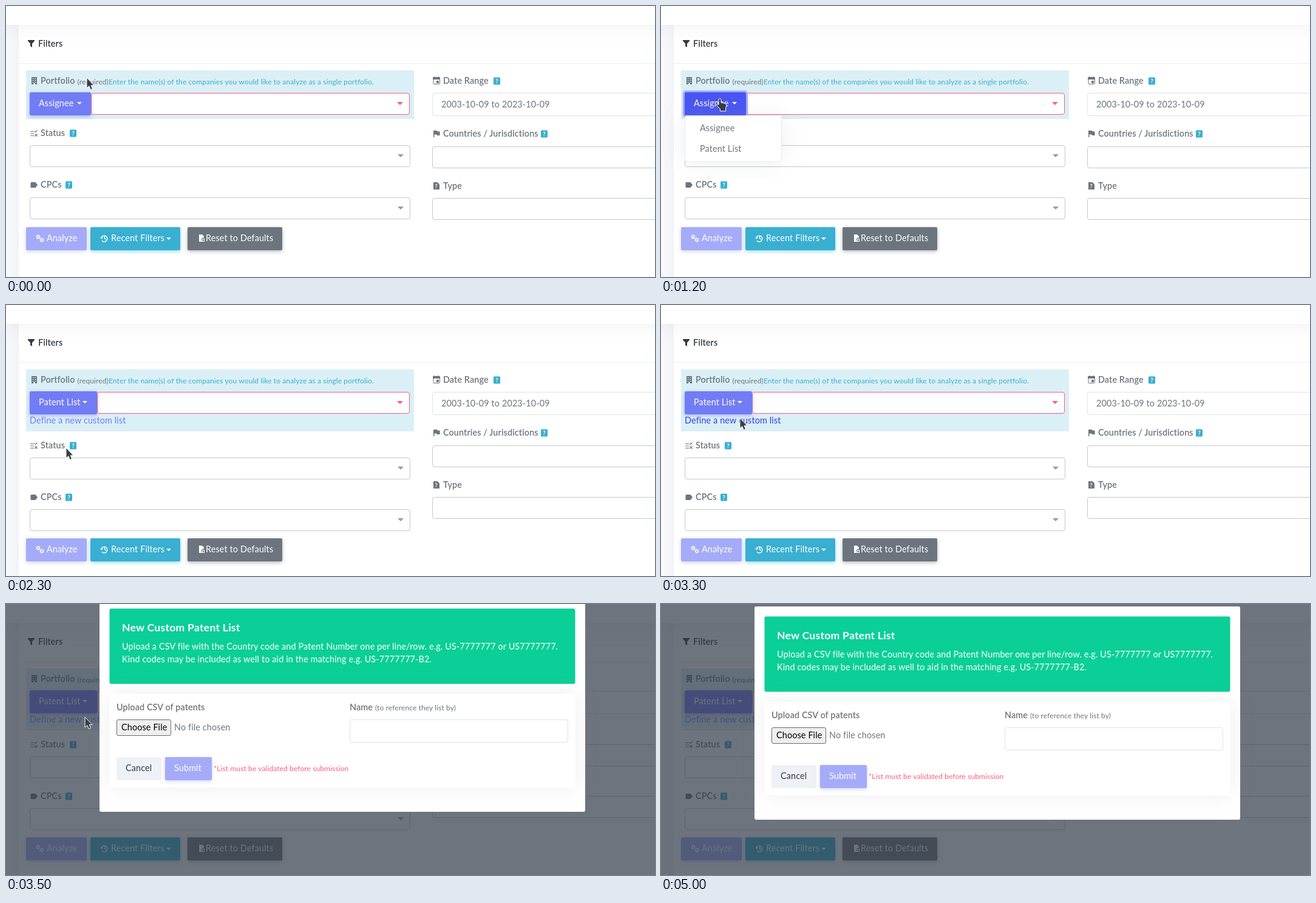
An HTML page that plays this animation: 1069x446 px, repeating every 6400 ms.

```html
<!DOCTYPE html>
<html lang="en">
<head>
<meta charset="utf-8">
<title>Portfolio filters</title>
<style>
  html, body { margin: 0; width: 100%; height: 100%; overflow: hidden; background: #fff; }
  svg { display: block; width: 1069px; height: 446px; }
  text { font-family: Lato, "Open Sans", sans-serif; font-size: 14.4px; letter-spacing: .13px; white-space: pre; }
  .soft { filter: drop-shadow(0 0 17.5px rgba(154, 161, 171, .18)); }
</style>
</head>
<body>
<svg id="stage" viewBox="0 0 1069 446"></svg>
<script>
const NS = 'http://www.w3.org/2000/svg';
const GRAY = '#6c757d', INFO = '#39afd1', RED = '#fa5c7c', DARK = '#313a46', LINE = '#c4c7ca', PALE = '#a5abf8';
const LOOP = 6400;
const stage = document.getElementById('stage');

function add(parent, tag, attrs) {
  const el = document.createElementNS(NS, tag);
  for (const k in attrs) el.setAttribute(k, attrs[k]);
  return parent.appendChild(el);
}
const group = (parent, attrs) => add(parent, 'g', attrs);
const path = (p, d, fill, more) => add(p, 'path', { d, fill, ...more });
const stroke = (p, d, color, w = 1.4) => path(p, d, 'none', { stroke: color, 'stroke-width': w });

// Filled box given by its edges
const fillBox = (p, x, y, r, b, fill, more) =>
  add(p, 'rect', { x, y, width: r - x, height: b - y, fill, ...more });

// Box with a crisp one pixel border
const field = (p, x, y, r, b, color, fill = '#fff', rx = 3.5) =>
  add(p, 'rect', { x: x + .5, y: y + .5, width: r - x - 1, height: b - y - 1, rx, fill, stroke: color });

// mid is the middle of the capitals
function text(p, str, x, mid, fill = GRAY, more = {}) {
  const el = add(p, 'text', { x, y: mid + 5, fill, ...more });
  el.textContent = str;
  return el;
}
const bold = (p, str, x, mid, fill = GRAY) =>
  text(p, str, x, mid, fill, { style: 'font-weight:600;letter-spacing:.1px' });
const small = (p, str, x, mid, fill = GRAY) =>
  text(p, str, x, mid - 1, fill, { style: 'font-size:12px;letter-spacing:.11px' });

const caret = (p, x, y, fill, w = 8, h = 4) => path(p, `M${x} ${y}h${w}l${-w / 2} ${h}z`, fill);

function help(p, x, y) {
  fillBox(p, x, y - .5, x + 11, y + 11.5, INFO, { rx: 1.5 });
  const q = add(p, 'text', { x: x + 5.5, y: y + 9, fill: '#fff', 'text-anchor': 'middle', style: 'font-size:10px;font-weight:700' });
  q.textContent = '?';
}
function select(p, x, y, r, color = LINE, arrow = '#999') {
  field(p, x, y, r, y + 36, color);
  caret(p, r - 21, y + 15, arrow, 10, 5);
}
const move = (el, x, y) => el.setAttribute('transform', `translate(${x} ${y})`);
const show = (el, on) => el.setAttribute('visibility', on ? 'visible' : 'hidden');

// ---- Page
fillBox(stage, 0, 0, 1069, 446, '#fafbfe');
fillBox(stage, 21, 20, 1110, 500, '#fff', { class: 'soft' });
fillBox(stage, -60, -60, 1130, 31, '#fff', { class: 'soft' });
path(stage, 'M36 56h11v1.5l-4 4.5v6l-3-2v-4l-4-4.500z', DARK);
bold(stage, 'Filters', 53, 62, DARK);
fillBox(stage, 21, 94, 1069, 95, '#eceff3');

// ---- Portfolio
const panel = fillBox(stage, 33, 106, 672, 186, '#dbeff6');
path(stage, 'M42 117h9v12h-3v-2h-3v2h-3z', GRAY);
stroke(stage, 'M43.500 119.500h6M43.500 122.500h6M43.500 125.500h6', '#dbeff6', 1);
stroke(stage, 'M46.500 118v8', GRAY, 1.5);
bold(stage, 'Portfolio', 57, 123);
small(stage, '(required)', 117.5, 124.5);
small(stage, 'Enter the name(s) of the companies you would like to analyze as a single portfolio.', 169, 124.5, INFO);
const search = group(stage);
const searchBox = field(search, 140, 143, 665, 179, RED);
caret(search, 644, 158, RED, 10, 5);
const link = text(stage, 'Define a new custom list', 39, 190);

// ---- Left column
const statusRow = group(stage);
stroke(statusRow, 'M40 206.500h6M40 210h6M40 213.500h6', GRAY, 1.2);
stroke(statusRow, 'M47 206l1.500 1.500 3-3M47.500 210.500l4 4M51.500 210.500l-4 4', GRAY, 1.1);
bold(statusRow, 'Status', 57, 209);
help(statusRow, 105, 204);
select(statusRow, 39, 229, 666);

const cpcLabel = group(stage);
path(cpcLabel, 'M42 290h6.500l3.500 4.500-3.500 4.500h-6.500q-1.500 0-1.500-1.500v-6q0-1.500 1.500-1.500z', GRAY);
bold(cpcLabel, 'CPCs', 57, 294);
help(cpcLabel, 98, 289);
const cpcSelect = group(stage);
select(cpcSelect, 39, 315, 666);

const actions = group(stage);
const button = (p, x, y, r, fill) =>
  fillBox(p, x, y, r, y + 38, fill, { rx: 2, style: `filter:drop-shadow(0 2px 3px ${fill}80)` });
const gear = (x, y, r) => {
  add(actions, 'circle', { cx: x, cy: y, r, fill: 'none', stroke: '#fff', 'stroke-width': 1.4 });
  add(actions, 'circle', { cx: x, cy: y, r: r + 1, fill: 'none', stroke: '#fff', 'stroke-width': 1, 'stroke-dasharray': '1.4 1.4' });
};
button(actions, 33, 364, 133, PALE);
gear(53, 380, 2.2);
gear(59, 385, 2.2);
text(actions, 'Analyze', 67, 382, '#fff');
button(actions, 139, 364, 287, INFO);
stroke(actions, 'M158 386.200a5 5 0 1 0-.8-5.200M162.500 379v3.500l2.500 1.500', '#fff');
path(actions, 'M155 380.500h5l-2.500 3z', '#fff');
text(actions, 'Recent Filters', 173, 382, '#fff');
caret(actions, 264, 381, '#fff');
button(actions, 299, 364, 455, GRAY);
path(actions, 'M318 376h5l3 3v2.500h-2.500l-2 2.500 1.500 4h-5z', '#fff');
stroke(actions, 'M323.500 383.500h3v4h-3z', '#fff', 1.2);
text(actions, 'Reset to Defaults', 329, 382, '#fff');

// ---- Right column
field(stage, 703.5, 117.5, 715, 129, GRAY, 'none', 1);
fillBox(stage, 703, 117, 715, 121, GRAY, { rx: 1 });
fillBox(stage, 709, 123, 713, 127, GRAY);
stroke(stage, 'M706 116v2M712 116v2', GRAY);
bold(stage, 'Date Range', 720, 123);
help(stage, 803, 118);
field(stage, 702, 143, 1110, 181, '#dee2e6');
text(stage, '2003-10-09 to 2023-10-09', 717, 162);
path(stage, 'M704 205h6l.6 1.500h4v6.500h-4.600l-.6-1.500h-3.900v4.500h-1.500z', GRAY);
bold(stage, 'Countries / Jurisdictions', 720, 210);
help(stage, 881, 205);
select(stage, 702, 231, 1310);
path(stage, 'M704 290h6.500l3.500 3.500v8.500h-10z', GRAY);
text(stage, '?', 706.5, 295, '#fff', { style: 'font-size:9px;font-weight:700' });
bold(stage, 'Type', 720, 296);
select(stage, 702, 316, 1310);

// ---- Mode button and its menu
const mode = group(stage);
const ring = add(mode, 'rect', { x: 37.5, y: 140.5, height: 41, rx: 3.5, fill: 'none', stroke: '#a9b0f3', 'stroke-width': 3 });
const modeBox = button(mode, 39, 142, 140, '#727cf5');
const modeText = text(mode, '', 54, 160, '#fff');
const modeCaret = caret(mode, 0, 158, '#fff');

const menu = group(stage);
fillBox(menu, 40, 181, 198, 257, '#fff', { rx: 3, class: 'soft' });
field(menu, 39, 180, 199, 257, '#e7ebf0');
const items = ['Assignee', 'Patent List'].map((label, i) => ({
  bg: fillBox(menu, 40, 185 + 34 * i, 198, 219 + 33 * i, '#e7e9ec'),
  label: text(menu, label, 64, 201 + 34 * i)
}));

// ---- Dialog
const shade = fillBox(stage, 0, 0, 1069, 446, DARK);
const modal = group(stage);
fillBox(modal, 154, 4, 954, 355, '#fff', { rx: 3 });
fillBox(modal, 170.5, 20.5, 937.5, 144.5, '#0acf97', { rx: 3 });
text(modal, 'New Custom Patent List', 191, 53, '#fff', { style: 'font-weight:700;font-size:17.6px;letter-spacing:.25px' });
text(modal, 'Upload a CSV file with the Country code and Patent Number one per line/row. e.g. US-7777777 or US7777777.', 191, 83, '#fff');
text(modal, 'Kind codes may be included as well to aid in the matching e.g. US-7777777-B2.', 191, 104, '#fff');
fillBox(modal, 170, 161, 938, 315, '#fff', { rx: 3, class: 'soft' });
bold(modal, 'Upload CSV of patents', 182, 183);
field(modal, 182, 203, 272, 230, '#6b6b6b', '#efefef', 2.5);
text(modal, 'Choose File', 190, 216, '#000');
text(modal, 'No file chosen', 277, 216);
bold(modal, 'Name', 566, 183);
small(modal, '(to reference they list by)', 608, 184);
field(modal, 566, 203, 926, 241, '#dee2e6');
fillBox(modal, 182, 265, 256, 303, '#eef2f7', { rx: 2 });
text(modal, 'Cancel', 197, 283, DARK);
button(modal, 262, 265, 339, PALE);
text(modal, 'Submit', 277, 283, '#fff');
small(modal, '*List must be validated before submission', 342, 284, RED);

// ---- Pointer
const ink = { stroke: '#fff', 'stroke-width': 1, 'stroke-linejoin': 'round' };
const arrow = path(stage, 'M0 0V17l3.800-3.300 2.500 6 3.200-1.400-2.400-5.600H12z', '#3b3b45', ink);
const hand = path(stage, 'M-2 .5Q0-2.500 2 .5V6l6 1.200q3 .8 2.800 3.500L9.500 16v4H.5v-3.500L-5 11q-1.500-2.500 1-3l2 1.500z', '#3b3b45', ink);

// time, x, y, shape (0 none, 1 arrow, 2 hand)
const pointer = [
  [0, 133, 118, 1], [300, 131, 121, 1], [400, 123, 130, 1], [500, 111, 142, 2], [600, 101, 150, 2], [700, 97, 153, 2],
  [1500, 97, 168, 2], [1600, 98, 208, 2], [1700, 99, 235, 2], [2000, 99, 235, 1],
  [2700, 106, 224, 1], [2800, 123, 195, 2], [2900, 130, 186, 2], [3300, 130, 186, 1],
  [4900, 79, 58, 1], [5000, 0, 0, 0]
];
// time, opacity, vertical offset
const dialog = [[0, 0, -50], [3400, .34, -37], [3500, 1, -13], [3700, 1, 0]];

const at = (track, t) => track.filter(row => row[0] <= t).pop();
const clamp = v => Math.max(0, Math.min(1, v));
const mix = (a, b, k) => `rgb(${a.map((v, i) => Math.round(v + (b[i] - v) * k))})`;

function draw(now) {
  // The screen advances ten times a second
  const t = Math.floor(now % LOOP / 100) * 100;
  const listed = t >= 2000;

  panel.setAttribute('height', listed ? 102 : 80);
  move(statusRow, 0, listed ? 22 : 0);
  move(cpcLabel, 0, listed ? 22 : 0);
  move(cpcSelect, 0, listed ? 21 : 0);
  move(actions, 0, listed ? 20 : 0);

  const right = listed ? 150 : 140;
  searchBox.setAttribute('x', right + .5);
  searchBox.setAttribute('width', 664 - right);
  modeBox.setAttribute('width', right - 39);
  ring.setAttribute('width', right - 36);
  modeText.textContent = listed ? 'Patent List' : 'Assignee';
  move(modeCaret, listed ? 126 : 117, 0);
  const fade = clamp((2300 - t) / 300);
  modeBox.setAttribute('fill', mix([114, 124, 245], [73, 85, 241], clamp((t - 500) / 150) * fade));
  ring.setAttribute('opacity', clamp((t - 800) / 150) * fade);

  show(link, listed);
  link.setAttribute('fill', t >= 2800 && t < 3400 ? '#323ce8' : '#727cf5');

  const slide = clamp((t - 900) / 300);
  show(menu, t >= 900 && !listed);
  move(menu, 0, 20 * (1 - slide) ** 2);
  const hot = t < 1600 ? -1 : t < 1700 ? 0 : 1;
  items.forEach((item, i) => {
    item.bg.setAttribute('opacity', i === hot ? 1 : 0);
    item.label.setAttribute('fill', i === hot ? DARK : GRAY);
  });

  const [, alpha, dy] = at(dialog, t);
  shade.setAttribute('opacity', .7 * alpha);
  modal.setAttribute('opacity', alpha);
  move(modal, 0, dy);

  const [, x, y, shape] = at(pointer, t);
  show(arrow, shape === 1);
  show(hand, shape === 2);
  move(arrow, x, y);
  move(hand, x, y);
}

const start = performance.now();
function tick() {
  draw(performance.now() - start);
  requestAnimationFrame(tick);
}
draw(0);
requestAnimationFrame(tick);
</script>
</body>
</html>
```
